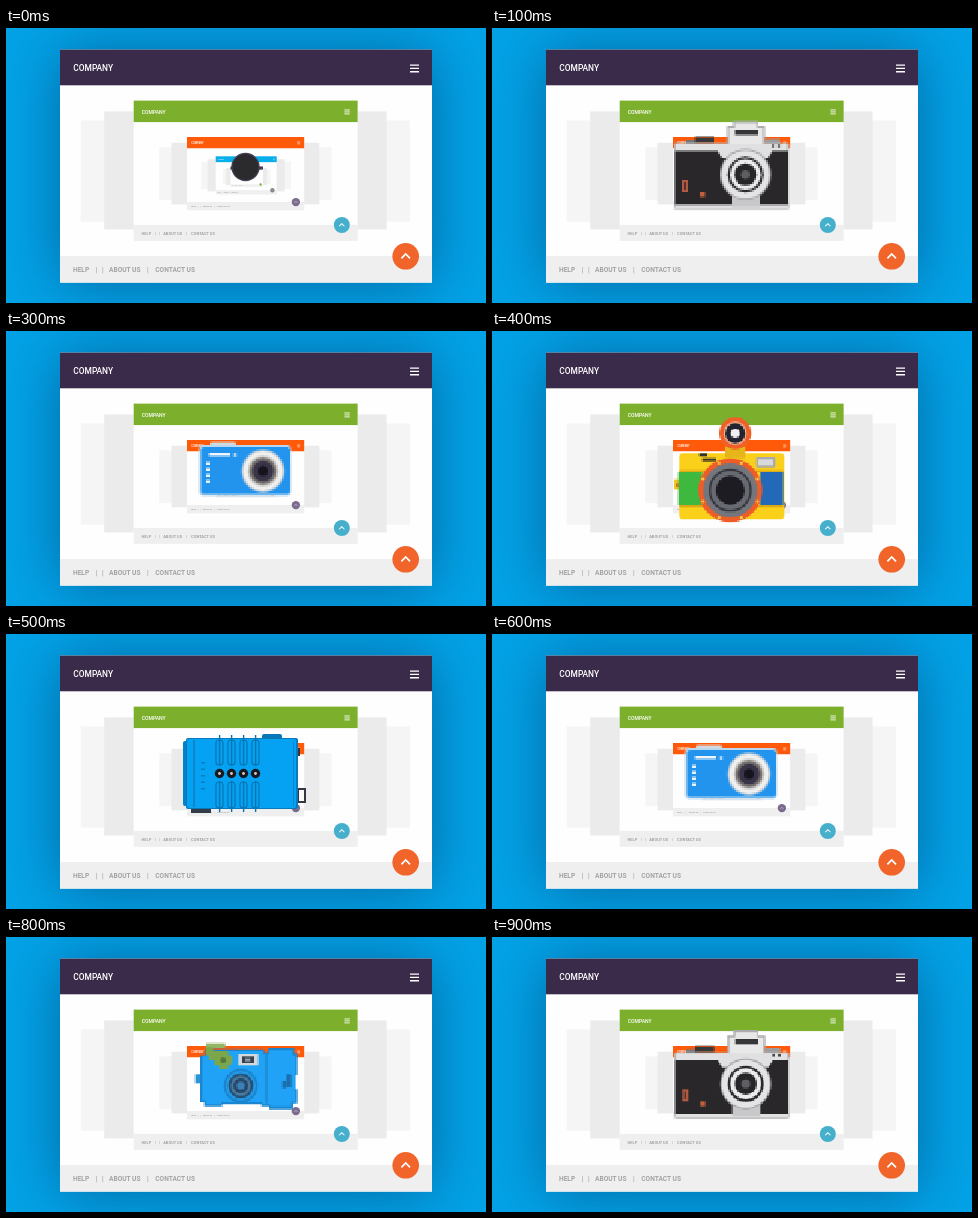
An HTML page with a canvas that plays this animation: 480 by 275 pixels, repeating every 1 s.

```html
<!DOCTYPE html>
<html lang="en">
<head>
<meta charset="utf-8">
<title>Nested pages</title>
<style>
html, body { margin: 0; width: 100%; height: 100%; overflow: hidden; background: #03a3e7; }
#stage { position: relative; width: 480px; height: 275px; overflow: hidden; }
#shade { position: absolute; left: 54px; top: 22px; width: 372px; height: 232px; box-shadow: 0 2px 56px rgba(0, 45, 95, .5); }
svg { position: absolute; left: 0; top: 0; }
text { font-family: Roboto, Arial, sans-serif; }
.brand { font-size: 8.4px; font-weight: 500; fill: #fff; }
.links { font-size: 6.6px; font-weight: 700; fill: #a3a3a3; }
canvas {
  position: absolute; left: 170px; top: 66px; width: 144px; height: 144px;
  image-rendering: pixelated; opacity: 0; animation: slot 1s step-end infinite;
}
@keyframes slot { 0% { opacity: 1; } 10%, 100% { opacity: 0; } }
</style>
</head>
<body>
<div id="stage">
  <div id="shade"></div>
  <svg width="480" height="275" viewBox="0 0 480 275">
    <defs>
      <g id="page">
        <rect width="372" height="233" fill="#fefefe"/>
        <rect width="372" height="35.7" style="fill:var(--head)"/>
        <rect y="206.4" width="372" height="26.6" fill="#efefef"/>
        <text class="brand" x="13.3" y="21.7">COMPANY</text>
        <path d="M350 15.5h9M350 18.8h9M350 22.1h9" stroke="#fff" stroke-width="1.4"/>
        <g class="links">
          <text x="13" y="222.9">HELP</text>
          <text x="35.5" y="222.9">|</text>
          <text x="42" y="222.9">|</text>
          <text x="49" y="222.9">ABOUT US</text>
          <text x="87" y="222.9">|</text>
          <text x="95.3" y="222.9">CONTACT US</text>
        </g>
        <circle cx="345.7" cy="206.7" r="13.3" style="fill:var(--btn)"/>
        <path d="M341.4 208.7l4.3-4.3 4.3 4.3" fill="none" stroke="#fff" stroke-width="1.7"/>
      </g>
      <g id="card">
        <rect x="-88" y="33" width="547" height="168" fill="#f5f5f5"/>
        <rect x="-49" y="18" width="469" height="196" fill="#ebebeb"/>
        <use href="#page"/>
      </g>
    </defs>
    <use href="#page" transform="translate(54 21.6)" style="--head:#3b2b4a;--btn:#f2652a"/>
    <use href="#card" transform="translate(127.7 72.6) scale(.602)" style="--head:#7cb02c;--btn:#45afcc"/>
    <use href="#card" transform="translate(181 109) scale(.315)" style="--head:#ff5a0a;--btn:#7b6b8c"/>
    <use href="#card" transform="translate(209.7 128.3) scale(.164)" style="--head:#08aeea;--btn:#858585"/>
    <use href="#card" transform="translate(224.5 138.5) scale(.087)" style="--head:#3b2b4a;--btn:#6fae2c"/>
  </svg>
</div>
<script>
const stage = document.getElementById('stage');
const LEFT = 170, TOP = 66, SIZE = 144;
let g;

function box(color, x, y, w, h) {
  g.fillStyle = color;
  g.fillRect(x, y, w, h);
}
function round(color, x, y, w, h, r) {
  g.fillStyle = color;
  g.beginPath();
  g.roundRect(x, y, w, h, r);
  g.fill();
}
function disc(color, x, y, r) {
  g.fillStyle = color;
  g.beginPath();
  g.arc(x, y, r, 0, 7);
  g.fill();
}
// Concentric discs, given as color, radius pairs from the outside in.
function rings(x, y, ...list) {
  for (let i = 0; i < list.length; i += 2) disc(list[i], x, y, list[i + 1]);
}
function shape(color, path) {
  g.fillStyle = color;
  g.fill(new Path2D(path));
}

function lensCap() {
  rings(239.5, 139, '#4a4458', 14.2, '#2b2a2c', 13);
}

function twinLens() {
  // Viewing hood
  box('#1b1a1d', 220, 73, 41, 35);
  box('#97959b', 223.5, 76, 34, 29);
  box('#232225', 225, 77.5, 31, 26);
  box('#bdb9c4', 229, 81, 23, 20);
  box('#5b5960', 231, 83, 19, 16);
  box('#c9c7cc', 239, 75, 3, 4);
  box('#1b1b1d', 223, 107, 36, 8);
  box('#a9a7ac', 225, 110, 32, 1.5);
  // Knobs and feet
  box('#3d3d40', 269, 135, 7, 23);
  box('#77777b', 271, 138, 3, 17);
  box('#333336', 208, 158, 5, 11);
  box('#b5b5b5', 205, 165, 4, 18);
  box('#202022', 212, 202, 6, 4);
  box('#202022', 263, 202, 6, 4);
  // Body
  round('#19191b', 217, 112, 48, 12, 2);
  box('#aaaaad', 220, 116, 42, 1.5);
  round('#161618', 211, 118, 59, 85, 3);
  round('#b0aeb4', 214, 122, 53, 78, 3);
  round('#1a191c', 216, 124, 49, 74, 2);
  box('#8c8c90', 219, 128, 4, 3);
  box('#8c8c90', 258, 128, 4, 3);
  // Lens plate
  rings(228, 158, '#c3c1c7', 7, '#222', 5, '#77777b', 3);
  rings(253, 158, '#c3c1c7', 7, '#222', 5, '#77777b', 3);
  rings(240, 144, '#c3c1c7', 12.5, '#222224', 9, '#5b5a60', 7.5);
  rings(240, 177, '#c3c1c7', 17, '#222224', 12.5, '#5b5a60', 10.5);
  box('#222224', 236, 157, 9, 3);
  box('#a5a5a8', 220, 191, 4, 3);
  box('#a5a5a8', 257, 191, 4, 3);
}

function fisheye() {
  box('#f6c51d', 182, 148, 6, 10);
  box('#d8432a', 184, 152, 2, 4);
  round('#fbd01b', 187, 122, 105, 66, 4);
  box('#3fb83f', 186, 141, 24, 33);
  box('#2468b8', 268, 141, 23, 33);
  box('#dca916', 187, 139, 104, 2);
  box('#dca916', 187, 174, 104, 2);
  box('#333', 207, 122, 8, 3);
  box('#3b3527', 210, 127, 14, 3);
  round('#a7a9ac', 264, 126, 19, 10, 1);
  box('#d7d9db', 266, 128, 15, 6);
  box('#e6b51a', 233, 115, 20, 12);
  rings(243, 102, '#ee6028', 16, '#f7b9a0', 11.5, '#22242f', 10, '#f0f0f2', 4.5);
  rings(238, 159, '#ee5c28', 32, '#74767d', 27, '#34353b', 21.5, '#686a72', 19.5, '#1d1c22', 14.5);
  for (let i = 0; i < 8; i++) {
    const a = (i + .5) * Math.PI / 4;
    disc('#fbd34a', 238 + 29.5 * Math.cos(a), 159 + 29.5 * Math.sin(a), 1.6);
  }
}

function topView() {
  box('#333840', 290, 114, 4, 8);
  box('#343645', 291, 154, 9, 15);
  box('#fafafa', 293, 156, 5, 11);
  box('#333d48', 185, 174, 20, 5);
  round('#0877b8', 256, 100, 20, 8, 2);
  round('#0880c5', 177, 107, 8, 65, 2);
  round('#0879b9', 180, 104, 112, 71, 2);
  round('#05a2f3', 181, 105, 109, 69, 2);
  box('#0b86ca', 187, 106, 2, 67);
  box('#0b86ca', 287, 107, 1, 65);
  g.strokeStyle = '#0874b2';
  g.lineWidth = 1.2;
  for (let i = 0; i < 4; i++) {
    const x = 213.5 + i * 12;
    box('#0874b2', x - .6, 101, 1.4, 31);
    box('#0874b2', x - .6, 147, 1.4, 31);
    g.beginPath();
    g.roundRect(x - 3.5, 106, 7, 25, 3);
    g.roundRect(x - 3.5, 148, 7, 26, 3);
    g.stroke();
    rings(x, 139.5, '#161a22', 4.7, '#e8c8c0', 1.4);
  }
  for (let y = 128; y < 157; y += 6.5) box('#087dbe', 195, y, 4, 1.5);
}

function compact() {
  round('#d5d8dc', 204, 111, 26, 7, 2);
  round('#b9d7ee', 193, 114, 92, 51, 4);
  round('#2394ee', 195, 116, 89, 47, 3);
  box('#eef5fb', 203, 122, 21, 3);
  disc('#b5d9f5', 229, 124, 1.8);
  for (let y = 131; y < 151; y += 6) box('#e8f3fc', 200, y, 4, 3);
  rings(257, 140, '#b9c9d6', 21.5, '#f0f0ef', 20, '#c7c6c5', 15.5, '#75706c', 13.5, '#393447', 10.5, '#15141c', 5);
}

function toy() {
  box('#2b93d8', 189, 137, 6, 9);
  shape('#1a86cf', 'M194 118H199V112H258V115H262V111H288V116H291V138H289V152H291V166H287V172H263V169H255V167H216V169H198V165H194Z');
  shape('#20a3f6', 'M196 119H201V114H257V117H263V113H286V118H289V164H285V169H264V167H256V165H215V167H200V163H196Z');
  box('#1b86cc', 259, 117, 2, 49);
  box('#1a6fae', 280, 137, 5, 13);
  box('#1a6fae', 276, 144, 4, 7);
  box('#93b566', 200, 106, 19, 5);
  shape('#7ba64a', 'M200 110H207V114H222V118H226V127H222V132H213V128H208V123H203V118H200Z');
  disc('#55783a', 217, 123, 3);
  box('#d3d8dc', 232, 117, 20, 11);
  box('#39424e', 236, 119, 12, 7);
  box('#94a3af', 239, 121, 5, 3);
  rings(234.5, 148.5, '#1a83cb', 17, '#249bea', 15, '#244f74', 12.5, '#4a7a9f', 10, '#25486a', 7.5, '#3a7fb5', 4);
}

function reflex() {
  box('#777779', 194, 112, 10, 5);
  box('#39383a', 203, 109, 19, 6);
  box('#9c9c9e', 273, 111, 15, 5);
  round('#b9b9bb', 182, 115, 115, 66, 2);
  box('#e2e2e3', 184, 116, 111, 7);
  box('#292729', 183, 123, 113, 54);
  box('#e0e0e1', 183, 177, 113, 3);
  box('#c8c8ca', 240, 166, 28, 13);
  shape('#acacae', 'M235 116V98H241V93H266V98H273V116Z');
  shape('#e8e8e8', 'M237 117V100H243V95H265V100H271V117Z');
  box('#363538', 243, 102, 23, 5);
  disc('#39383a', 281, 118, 1.5);
  disc('#39383a', 287, 118, 1.5);
  shape('#e0e0e2', 'M226 116H280V124L276 130H230L226 124Z');
  box('#b05a43', 190, 152, 6, 12);
  box('#55322c', 192, 154, 2, 8);
  box('#c0603c', 208, 164, 5, 5);
  rings(253.5, 146.5, '#a4a4a7', 25.5, '#e4e4e6', 24, '#29282a', 18, '#ececee', 15.5, '#262528', 11, '#5f5e63', 4.5);
}

// One drawing and pixel size per tenth of the loop.
const slots = [
  [lensCap, 1], [reflex, 2], [twinLens, 1.5], [compact, 2], [fisheye, 1.5],
  [topView, 1], [compact, 2], [fisheye, 1.5], [toy, 1.5], [reflex, 1.5]
];
slots.forEach(([draw, px], i) => {
  const canvas = document.createElement('canvas');
  canvas.width = canvas.height = SIZE / px;
  canvas.style.animationDelay = i * 100 - 1000 + 'ms';
  g = canvas.getContext('2d');
  g.scale(1 / px, 1 / px);
  g.translate(-LEFT, -TOP);
  draw();
  stage.append(canvas);
});
</script>
</body>
</html>
```
